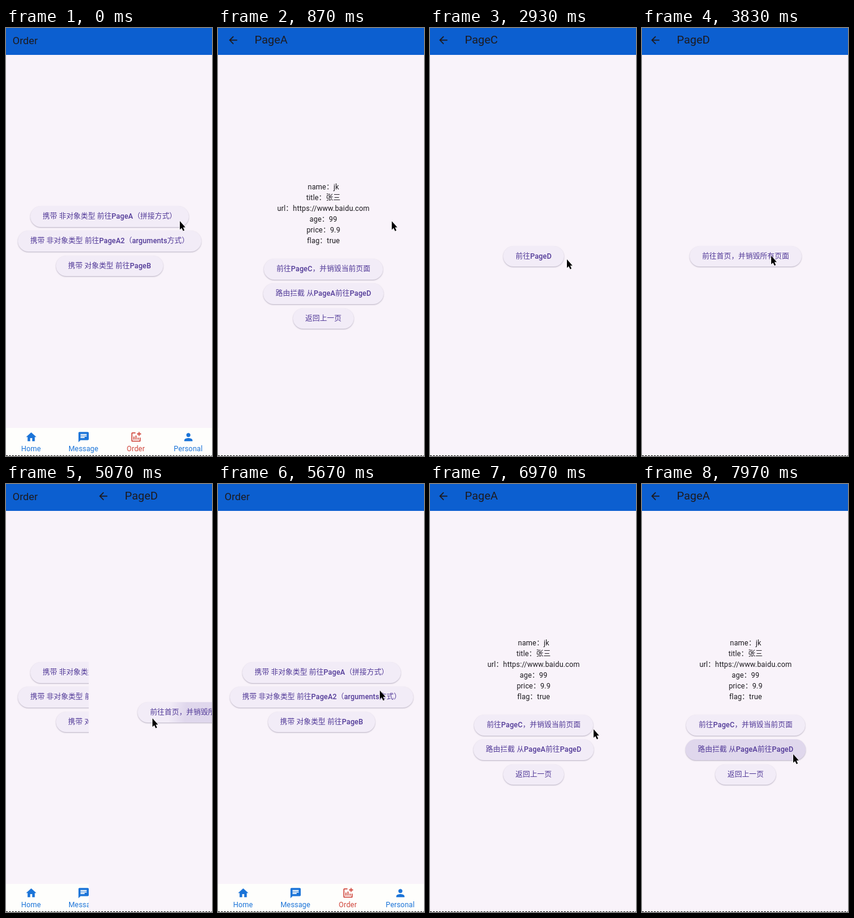
These frames come from a looping animation (346 px wide and 716 px high, 8 s). An HTML page:

```html
<!DOCTYPE html>
<html lang="zh-CN">
<head>
<meta charset="utf-8">
<style>
html, body { margin: 0; width: 100%; height: 100%; overflow: hidden; }
body { position: relative; background: #f9f3fa; color: #1d1b20;
  font: 12.1px/18px Roboto, "Noto Sans CJK SC", sans-serif; text-spacing-trim: space-all; }
.page { position: absolute; left: -2px; top: 0; width: 352px; height: 716px; background: #f9f3fa; overflow: hidden; }
.bar { height: 45px; background: #0c5fd0; }
.title { position: absolute; left: 60.5px; top: 8px; font-size: 19px; line-height: 24px; }
#order .title { left: 13px; top: 9px; font-size: 17.3px; }
svg { width: 20.7px; height: 20.7px; fill: currentColor; }
.back { position: absolute; left: 13.6px; top: 9.8px; }
.info, .row { position: absolute; width: 100%; text-align: center; }
.info { top: 257px; letter-spacing: .14px; white-space: pre; }
.row { display: flex; justify-content: center; }
.btn { height: 34.6px; line-height: 34.6px; padding: 0 20.7px; border-radius: 18px; white-space: nowrap;
  font-weight: 500; letter-spacing: .09px; color: #523a98; background-color: #f2ecf7;
  box-shadow: 0 1px 2px rgba(40, 30, 70, .3); }
.nav { position: absolute; top: 669px; width: 100%; height: 47px; display: flex; background: #fefefc; color: #1b74d8; }
.nav div { flex: 1; text-align: center; letter-spacing: .14px; padding-top: 5px; }
.nav svg { display: block; margin: 0 auto; }
.nav span { display: block; }
.nav .on { color: #d0463c; }
#edge { position: absolute; left: 0; right: 0; top: 715px; height: 1px;
  background: repeating-linear-gradient(90deg, #000 0 3px, #fefefc 3px 5px); }
#cursor { position: absolute; left: 0; top: 0; width: 14px; height: 20px; overflow: visible;
  fill: #000; stroke: #fff; stroke-width: 1; paint-order: stroke; }
</style>
</head>
<body>
<script>
const icon = (d, cls = "") => `<svg class="${cls}" viewBox="0 0 24 24"><path d="${d}"/></svg>`;
const ARROW = "M20 11H7.83l5.59-5.59L12 4l-8 8 8 8 1.41-1.41L7.83 13H20v-2z";
const TABS = [
  ["Home", "M10 20v-6h4v6h5v-8h3L12 3 2 12h3v8z"],
  ["Message", "M20 2H4c-1.1 0-2 .9-2 2v18l4-4h14c1.1 0 2-.9 2-2V4c0-1.1-.9-2-2-2zM6 9h12v2H6V9zm8 5H6v-2h8v2zm4-6H6V6h12v2z"],
  ["Order", "M22 5v2h-3v3h-2V7h-3V5h3V2h2v3h3zm-3 14H5V5h6V3H5c-1.1 0-2 .9-2 2v14c0 1.1.9 2 2 2h14c1.1 0 2-.9 2-2v-6h-2v6zm-4-6v4h2v-4h-2zm-4 4h2V9h-2v8zm-2 0v-6H7v6h2z"],
  ["Personal", "M12 12c2.21 0 4-1.79 4-4s-1.79-4-4-4-4 1.79-4 4 1.79 4 4 4zm0 2c-2.67 0-8 1.34-8 4v2h16v-2c0-2.66-5.33-4-8-4z"]
];

function addPage(id, title, top, labels, extra = "") {
  const page = document.createElement("div");
  page.id = id;
  page.className = "page";
  page.innerHTML = `<div class="bar"></div><div class="title">${title}</div>` + extra +
    labels.map((s, i) => `<div class="row" style="top:${top + 41.3 * i}px"><div class="btn">${s}</div></div>`).join("");
  document.body.append(page);
  return page;
}

const back = icon(ARROW, "back");
const nav = `<div class="nav">${TABS.map(([s, d]) =>
  `<div class="${s === "Order" ? "on" : ""}">${icon(d)}<span>${s}</span></div>`).join("")}</div>`;
const info = `<div class="info">name：jk
title：张三
url：https://www.baidu.com
age：99
price：9.9
flag：true</div>`;

const order = addPage("order", "Order", 298, ["携带 非对象类型 前往PageA（拼接方式）",
  "携带 非对象类型 前往PageA2（arguments方式）", "携带 对象类型 前往PageB"], nav);
const pageA = addPage("a", "PageA", 386, ["前往PageC，并销毁当前页面",
  "路由拦截 从PageA前往PageD", "返回上一页"], back + info);
const pageC = addPage("c", "PageC", 364.5, ["前往PageD"], back);
const pageD = addPage("d", "PageD", 364.5, ["前往首页，并销毁所有页面"], back);
document.body.insertAdjacentHTML("beforeend", `<div id="edge"></div>
  <svg id="cursor" viewBox="0 0 14 20"><path d="M1 1V15.2L4 12.4 6.5 17.6 8.7 16.6 6.4 11.4H10.3Z"/></svg>`);
const cursor = document.getElementById("cursor");

// pointer stops: time, x, y
const PATH = [[0, 291, 322], [850, 291, 322], [1430, 262, 379], [1950, 262, 398],
  [2530, 262, 398], [2670, 229, 386], [2930, 229, 386], [2990, 216, 380], [4270, 216, 380], [4570, 245, 391],
  [5250, 245, 391], [6050, 293, 305], [6500, 293, 305], [7310, 262, 473], [7450, 253, 451], [8000, 253, 451]];

// presses: button, start, end, x, y
const btn = (page, i) => page.querySelectorAll(".btn")[i];
const PRESSES = [[btn(order, 0), 430, 950, 291, 322], [btn(pageA, 0), 2140, 2650, 262, 398],
  [btn(pageC, 0), 2990, 3400, 216, 380], [btn(pageD, 0), 4840, 5300, 245, 391],
  [btn(order, 0), 6110, 6650, 293, 305], [btn(pageA, 1), 7450, 8000, 253, 451]];

const W = 352, LOOP = 8000;

function pointer(t) {
  const i = PATH.findIndex(p => p[0] > t);
  const [t0, x0, y0] = PATH[i - 1], [t1, x1, y1] = PATH[i];
  const u = (t - t0) / (t1 - t0), k = u * u * (3 - 2 * u);
  return [x0 + (x1 - x0) * k, y0 + (y1 - y0) * k];
}

// distance still to travel for a page that starts moving at the given time
function remaining(t, start) {
  const x = Math.max(0, (t - start) / 20);
  return W * (1 + x) * Math.exp(-x);
}

function place(page, x) {
  page.style.visibility = x < W ? "visible" : "hidden";
  page.style.transform = `translateX(${Math.round(x)}px)`;
}

function draw(t) {
  const slide = start => remaining(t, start);
  const first = t < 4000;
  place(pageA, slide(first ? 733 : 6399));
  place(pageC, first ? slide(2430) : W);
  place(pageD, first ? slide(3190) : W - slide(5043.5));

  for (const [el] of PRESSES) el.style.backgroundImage = "none";
  for (const [el, start, end, x, y] of PRESSES) {
    if (t < start || t >= end) continue;
    const r = 10 + (t - start) * .45;
    const cx = x + 2 - el.offsetLeft, cy = y - el.parentNode.offsetTop;
    el.style.backgroundImage = `radial-gradient(circle at ${cx}px ${cy}px,
      rgba(90, 65, 160, .12) ${r * .75}px, rgba(90, 65, 160, 0) ${r}px)`;
  }

  const [x, y] = pointer(t);
  cursor.style.transform = `translate(${x}px, ${y}px)`;
}

const begin = performance.now();
function tick() {
  draw((performance.now() - begin) % LOOP);
  requestAnimationFrame(tick);
}
tick();
</script>
</body>
</html>
```
